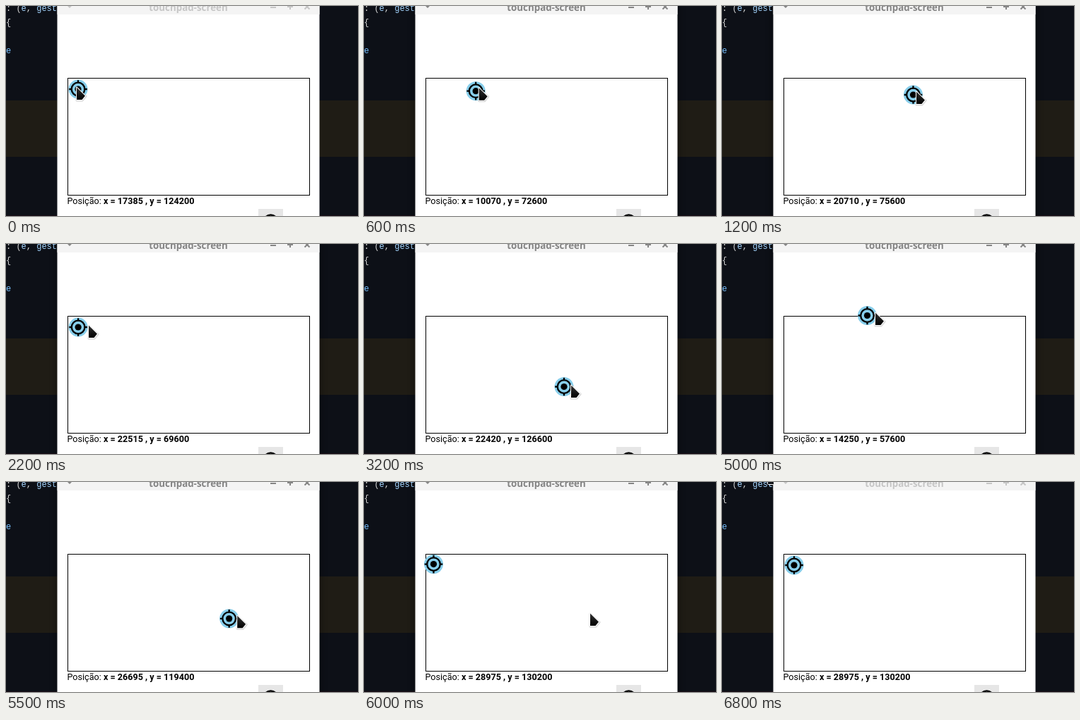
Write an HTML page that moves like this. It is 498 px wide and 298 px high and loops after 6.9 s.

```html
<!DOCTYPE html>
<html lang="pt">
<head>
<meta charset="utf-8">
<style>
html, body { margin: 0; width: 100%; height: 100%; overflow: hidden; background: #0d1017; }
svg { display: block; }
text { white-space: pre; }
.code { font: 12px "Liberation Mono", monospace; fill: #d4d4d4; }
.pale { fill: #a5d6ff; }
.blue { fill: #79c0ff; }
.title { font: bold 13.333px "Noto Sans", sans-serif; text-anchor: middle; }
.label { font: 12.6px Roboto, sans-serif; }
.bar { color: #c6c6c6; }
.focused .bar { color: #858585; }
.shade { opacity: 0; }
.focused .shade { opacity: .3; }
</style>
</head>
<body>
<svg width="498" height="298" viewBox="0 0 498 298">
  <defs>
    <filter id="blur" x="-10%" width="120%"><feGaussianBlur stdDeviation="5"/></filter>
    <linearGradient id="ink" x2="0" y2="1"><stop stop-color="#333"/><stop offset="1"/></linearGradient>
  </defs>
  <rect width="498" height="298" fill="#0d1017"/>
  <rect y="134" width="498" height="80" fill="#1f1c15"/>
  <rect y="297" width="498" height="1" fill="#1a0d15"/>
  <g class="code">
    <text y="7">: (<tspan class="pale">e</tspan>, <tspan class="pale">gest</tspan></text>
    <text y="27">{</text>
    <text y="67" class="blue">e</text>
  </g>
  <g id="win">
    <rect class="shade" x="70" y="-20" width="376" height="340" filter="url(#blur)"/>
    <rect x="72.5" width="371" height="298" fill="#fff"/>
    <g class="bar">
      <rect x="72.5" width="371" height="12" fill="#f4f4f4"/>
      <text class="title" x="258" y="7" fill="currentColor">touchpad-screen</text>
      <path d="M86-1h8l-4 4z" fill="currentColor"/>
      <path d="M374 2h8M398 1h8M402-3v8M422.5-2.5l7 7m0-7l-7 7" stroke="currentColor" stroke-width="2"/>
    </g>
    <rect x="87.5" y="102.5" width="342" height="166" fill="none" stroke="#000"/>
    <text class="label" x="86.5" y="281">Posição: <tspan id="pos" font-weight="bold"></tspan></text>
    <rect x="357" y="288" width="35" height="10" fill="#e6e6e6"/>
    <circle cx="374.5" cy="306.5" r="10" fill="none" stroke="#000" stroke-width="2.5"/>
  </g>
  <g id="target">
    <circle r="13.5" fill="#87ceeb"/>
    <circle r="9.3" fill="none" stroke="#000" stroke-width="2.3"/>
    <circle r="4.6"/>
    <path d="M0-12.8v4M0 12.8v-4M-12.8 0h4M12.8 0h-4" stroke="#000" stroke-width="2.3"/>
  </g>
  <g id="arrow" stroke-linejoin="round">
    <path d="M1 1V19H9L14 13z" stroke="#000" stroke-width="3" opacity=".15"/>
    <path d="M1 .5V18H8.5L13 12.5z" fill="url(#ink)" stroke="#fff" stroke-width="2" paint-order="stroke"/>
  </g>
  <rect id="beam" x="-3.5" y="-2" width="9" height="9.5" rx="1" fill="#0d1017" stroke="#fff"/>
</svg>
<script>
const LOOP = 6900, STEP = 100, HOME = { x: 102, y: 118 };

// Pointer waypoints: time, x, y
const PATH = [
  [0, 99, 115], [300, 105.5, 113], [1200, 274, 121], [1500, 293, 111],
  [2200, 116, 115], [2300, 111, 115.5], [3200, 292, 200], [3500, 292, 200],
  [4600, 112.5, 113.5], [4700, 112.5, 113.5], [5000, 216, 97], [5590, 346, 206],
  [6000, 319, 186], [6700, 100, 20], [6800, 68, -4], [LOOP, 68, -4]
];
// Reported position = pointer + shift, drifting from one shift to the other
const DRAGS = [
  { start: 300, end: 1500, from: [-56, 5], to: [-56, 5] },
  { start: 2300, end: 3300, from: [-56, 11], to: [-56, 11] },
  { start: 4700, end: 5590, from: [-78.7, -7.1], to: [-41, 11] }
];
const el = id => document.getElementById(id);
const show = (id, on) => el(id).style.display = on ? "" : "none";
const place = (id, p) => el(id).setAttribute("transform", `translate(${p.x} ${p.y})`);
const mix = (a, b, p) => a + (b - a) * p;

function pointer(t) {
  const i = PATH.findIndex(k => k[0] > t), a = PATH[i - 1], b = PATH[i];
  const p = (t - a[0]) / (b[0] - a[0]);
  return { x: mix(a[1], b[1], p), y: mix(a[2], b[2], p) };
}

// Underdamped return to rest, s in seconds
function spring(s) {
  const w = 10.45, d = 11;
  return Math.exp(-d * s) * (Math.cos(w * s) + d / w * Math.sin(w * s));
}

function state(t) {
  const drag = DRAGS.filter(d => d.start <= t).pop();
  if (!drag) return { target: HOME, x: 183, y: 207 };
  const { start, end, from, to } = drag;
  const held = Math.min(t, end), grab = pointer(start), at = pointer(held);
  const pull = spring((t - held) / 1000), p = (held - start) / (end - start);
  return {
    target: { x: HOME.x + (at.x - grab.x) * pull, y: HOME.y + (at.y - grab.y) * pull },
    x: Math.round(at.x + mix(from[0], to[0], p)),
    y: Math.round(at.y + mix(from[1], to[1], p))
  };
}

function draw(t) {
  const mouse = pointer(t), { target, x, y } = state(t), overCode = mouse.x < 72;
  el("pos").textContent = `x = ${95 * x} , y = ${600 * y}`;
  el("win").setAttribute("class", t >= DRAGS[0].start && !overCode ? "focused" : "");
  place("target", target);
  place("arrow", mouse);
  place("beam", mouse);
  show("arrow", !overCode);
  show("beam", overCode);
}

const begin = performance.now();
function tick() {
  const t = Math.floor((performance.now() - begin) % LOOP / STEP) * STEP;
  draw(t < 2 * STEP ? 0 : t);
  requestAnimationFrame(tick);
}
tick();
</script>
</body>
</html>
```
